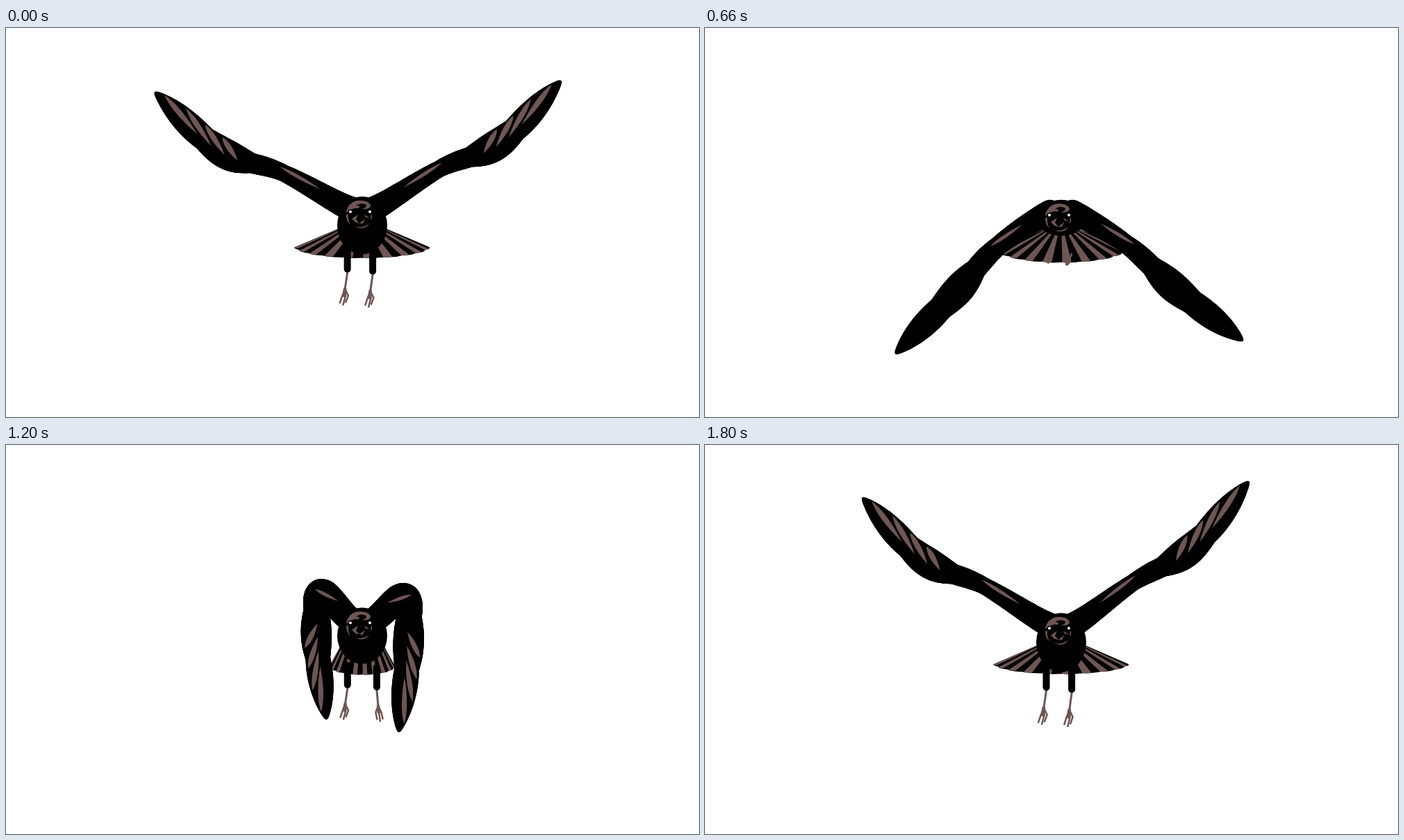
An HTML page with a canvas for the animation above (1.83 s loop, 998 by 561 pixels).

```html
<!DOCTYPE html>
<html lang="en">
<head>
<meta charset="utf-8">
<title>Crow in flight</title>
<style>
html, body { margin: 0; width: 100%; height: 100%; overflow: hidden; background: #fff; }
canvas { display: block; width: 100%; height: 100%; }
</style>
</head>
<body>
<canvas id="stage" width="998" height="561"></canvas>
<script>
const ctx = document.getElementById('stage').getContext('2d');
const LOOP = 1830, STEP = 30, MIDDLE = 513, LAG = 15;
const BLACK = '#000', BROWN = '#6e5655';

// Key poses of one wing: elbow, wrist and tip, with x measured outward from the body.
const poses = [
  { t: 0, joints: [115, 205, 201, 172, 293, 85] },
  { t: 240, joints: [110, 259, 212, 248, 361, 195] },
  { t: 480, joints: [110, 296, 222, 338, 364, 346] },
  { t: 870, joints: [76, 318, 85, 400, 110, 547] },
  { t: 1200, joints: [60, 217, 66, 290, 52, 405] },
  { t: 1410, joints: [48, 195, 76, 168, 86, 228] },
  { t: 1680, joints: [75, 185, 140, 105, 207, 0] }
];

const clamp = x => Math.max(0, Math.min(1, x));
const lerp = (a, b, s) => a + (b - a) * s;
const mix = (a, b, s) => a.map((v, i) => lerp(v, b[i], s));
const wrap = t => (t + LOOP) % LOOP;
const swing = (t, peak) => Math.cos((t - peak) / LOOP * 2 * Math.PI);

// Bell curve around a moment of the loop.
function bump(t, peak, width) {
  const d = (t - peak + LOOP * 1.5) % LOOP - LOOP / 2;
  return Math.exp(-((d / width) ** 2));
}

function hermite(a, b, m0, m1, s) {
  const r = 1 - s;
  return a * (1 + 2 * s) * r * r + b * s * s * (3 - 2 * s) + m0 * s * r * r - m1 * s * s * r;
}

function jointsAt(t) {
  const n = poses.length;
  const pose = i => poses[(i + n) % n].joints;
  const time = i => poses[(i + n) % n].t + LOOP * Math.floor(i / n);
  let i = n - 1;
  while (poses[i].t > t) i--;
  const h = time(i + 1) - time(i);
  return pose(i).map((a, k) => {
    const b = pose(i + 1)[k];
    const m0 = (b - pose(i - 1)[k]) / (time(i + 1) - time(i - 1));
    const m1 = (pose(i + 2)[k] - a) / (time(i + 2) - time(i));
    return hermite(a, b, m0 * h, m1 * h, (t - time(i)) / h);
  });
}

function fill(color, draw) {
  ctx.beginPath();
  draw();
  ctx.fillStyle = color;
  ctx.fill();
}

function line(color, width, ...points) {
  ctx.beginPath();
  points.forEach(p => ctx.lineTo(...p));
  ctx.strokeStyle = color;
  ctx.lineWidth = width;
  ctx.stroke();
}

function shape(color, path) {
  ctx.fillStyle = color;
  ctx.fill(new Path2D(path));
}

// Pointed streak from a to b.
function streak(a, b, width) {
  const len = Math.hypot(b[0] - a[0], b[1] - a[1]) || 1;
  const nx = (a[1] - b[1]) / len * width, ny = (b[0] - a[0]) / len * width;
  const [mx, my] = mix(a, b, .35);
  fill(BROWN, () => {
    ctx.moveTo(...a);
    ctx.quadraticCurveTo(mx + nx, my + ny, ...b);
    ctx.quadraticCurveTo(mx - nx, my - ny, ...a);
  });
}

// A wing grows along a spine; s is 0 at the shoulder, 1 elbow, 2 wrist, 3 tip.
function drawWing(t, eye, side) {
  const [ex, ey, wx, wy, tx, ty] = jointsAt(t);
  const root = [16, eye - 4];
  const pts = [[-16, eye - 4], root, [ex, ey], [wx, wy], [tx, ty], [2 * tx - wx, 2 * ty - wy]];
  const arm = 12 + 10 * bump(t, 1080, 300), hand = 21 - 7 * bump(t, 240, 110);

  const spine = s => {
    const i = Math.min(2, Math.floor(s)), [p, a, b, q] = pts.slice(i, i + 4);
    return [0, 1].map(k => hermite(a[k], b[k], (b[k] - p[k]) / 2, (q[k] - a[k]) / 2, s - i));
  };
  const half = s => {
    const lobes = .88 + .18 * Math.abs(Math.sin(s * 4.2));
    if (s < 1) return lerp(18, arm, s);
    if (s < 2) return lerp(arm, hand, (s - 1) ** 2 * (5 - 2 * s)) * lobes;
    return hand * (1 - (s - 2) ** 2) ** .6 * lobes;
  };
  // v is -1 on the trailing edge and 1 on the leading edge.
  const spot = (s, v) => {
    const [x, y] = spine(s), [x2, y2] = spine(s + .01);
    const k = half(s) * v / (Math.hypot(x2 - x, y2 - y) || 1);
    return [x + (y2 - y) * k, y - (x2 - x) * k];
  };

  ctx.save();
  ctx.translate(MIDDLE, 0);
  ctx.scale(side, 1);
  for (let s = 0; s < 3; s += .02) fill(BLACK, () => ctx.arc(...spine(s), half(s), 0, 7));
  streak(spot(1.05, .5), spot(.5, .3), 5);
  const shine = clamp(1 - 1.8 * bump(t, 650, 300));
  for (let i = 0; i < 4; i++) {
    const s = 2.9 - i * .27;
    streak(spot(s, .85), spot(s - .55 + i * .06, -.1), 8 * shine);
  }
  ctx.restore();
}

function drawTail(t, eye) {
  const count = 10, gap = Math.PI / count;
  const spread = 98 - 60 * bump(t, 1090, 250);
  const top = 315 + 16 * bump(t, 940, 200);
  const depth = 328 + 38 * bump(t, 300, 200) + 21 * bump(t, 880, 240) - top;
  const rim = (a, k) => [MIDDLE + spread * k * Math.sin(a), top + depth * k * Math.cos(a)];
  const base = a => [MIDDLE + 24 * Math.sin(a), eye + 20 + 4 * Math.cos(a)];
  const feather = (color, a, b) => fill(color, () => {
    ctx.moveTo(...base(a));
    ctx.lineTo(...rim(a, .96));
    ctx.quadraticCurveTo(...rim((a + b) / 2, 1.06), ...rim(b, .96));
    ctx.lineTo(...base(b));
  });
  for (let i = 0; i < count; i++) {
    const a = i * gap - Math.PI / 2;
    feather(BLACK, a - .02, a + gap + .02);
    feather(BROWN, a + gap * .05, a + gap * .52);
  }
}

function drawLeg(ankle, toe, reach) {
  const foot = mix(ankle, toe, .5), size = (toe[1] - ankle[1]) / 50;
  line(BROWN, 3, ankle, foot);
  line(BROWN, 5 * size, foot, mix(foot, toe, .4));
  [-4, 1, 5].forEach(dx => line(BROWN, 2.5, foot,
    [foot[0] + dx * size, foot[1] + 10 * size], [toe[0] + dx * size, toe[1] - Math.abs(dx) * size]));
  if (reach > .1) line(BLACK, 10 * clamp(reach * 1.5), [ankle[0], ankle[1] - 45 * reach], [ankle[0], ankle[1] - 5]);
}

function drawLegs(t, reach) {
  const ankle = 326 + 38 * reach, toe = ankle + 16 + 40 * reach, apart = bump(t, 1300, 250);
  drawLeg([494 - 3 * reach, ankle - 3], [494 - 12 * reach, toe - 3], reach);
  drawLeg([528 + 7 * apart, ankle], [521 + 20 * apart, toe], reach);
}

function drawHead(eye) {
  ctx.save();
  ctx.translate(0, eye);
  fill(BLACK, () => ctx.arc(510, 4, 25, 0, 7));
  shape(BROWN, 'M490 0Q493-13 505-16Q519-18 525-10Q526-3 512-4Q520-6 519-10Q511-14 504-9Q511-9 508-5Q500-7 491 1Z');
  shape(BROWN, 'M490 4Q490 14 496 19Q492 11 493 4ZM498 10L507 4L504 11L509 17L503 15ZM516 4L524 9L518 8ZM509 17L517 10L514 17Z');
  shape(BROWN, 'M497 18Q510 27 523 17Q515 30 497 18ZM526 3Q529 8 525 12Z');
  for (const x of [496, 524]) {
    fill(BLACK, () => ctx.arc(x, 0, 3.5, 0, 7));
    fill('#fff', () => ctx.arc(x, 0, 2, 0, 7));
  }
  ctx.restore();
}

const start = performance.now();

function frame() {
  const t = Math.floor((performance.now() - start) % LOOP / STEP) * STEP;
  const eye = 264 + 8.5 * swing(t, 420);
  const reach = clamp(.5 + .55 * swing(t, 1530));
  ctx.fillStyle = '#fff';
  ctx.fillRect(0, 0, 998, 561);
  ctx.lineCap = ctx.lineJoin = 'round';
  drawTail(t, eye);
  drawWing(wrap(t + LAG), eye, -1);
  drawWing(wrap(t - LAG), eye, 1);
  fill(BLACK, () => ctx.ellipse(MIDDLE, eye + 4 + 20 * reach, 36, 26 + 20 * reach, 0, 0, 7));
  drawLegs(t, reach);
  drawHead(eye);
  requestAnimationFrame(frame);
}
frame();
</script>
</body>
</html>
```
